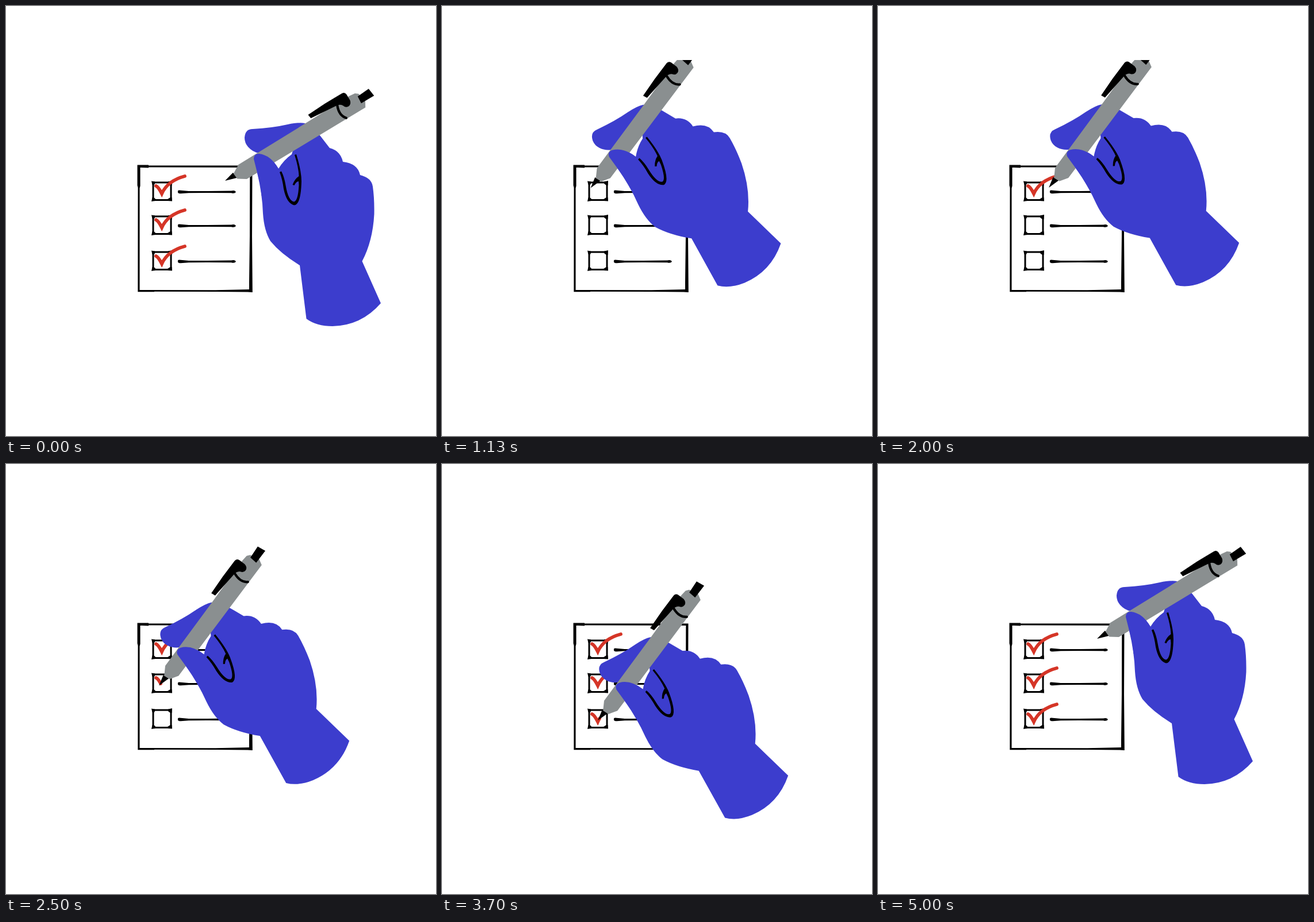
An HTML page for the animation above (5810 ms loop, 748x748 px).

```html
<!DOCTYPE html>
<html lang="en">
<head>
<meta charset="utf-8">
<title>Checklist</title>
<style>
  html, body { margin: 0; width: 100%; height: 100%; overflow: hidden; background: #fff; }
  svg { display: block; width: 100%; height: 100%; }
  .blue { fill: #3c3dcd; }
  .ink { fill: none; stroke: #000; stroke-linecap: round; }
  .check { fill: none; stroke: #d53527; stroke-width: 5.8; stroke-linecap: round; stroke-miterlimit: 6; }
</style>
</head>
<body>
<svg viewBox="0 0 748 748">
  <defs>
    <clipPath id="view"><rect y="94" width="748" height="654"/></clipPath>
    <g id="row">
      <path d="M256 307H287V337.500H256Z" fill="none" stroke="#000" stroke-width="3"/>
      <path d="M253 304.500L259 305.500V309L257 312L254.500 311ZM289 304L282 305.500V309L286 312H288.500ZM253 340L260 339V335.500L257 333H254.500ZM289 339.500L281 339V336L286 333H288.500Z"/>
      <path d="M299 321.500Q300 320 304 320.800L318 322H350L392 321.600Q398 320 400 323.500Q398 327 392 325.300L350 325L318 325.200L304 326.200Q298 327 299 321.500Z"/>
    </g>
  </defs>

  <g id="paper">
    <path d="M228.500 276.500H248L248 277.500H428.500L428 400L428.800 498L420 497.500L366 497L258 496.800V497.300H229.300L229.500 316L228.500 312ZM233.500 281V313L232.500 317V494L364 494.300L423 493V480L424 400L424.300 281L248 280.600V281.500Z" fill-rule="evenodd"/>
    <use href="#row"/>
    <use href="#row" y="59"/>
    <use href="#row" y="121"/>
  </g>
  <g id="checks"></g>

  <g clip-path="url(#view)">
    <g id="hand">
      <path class="blue" d="M440 256Q429 254 421 245Q415 238 415 229Q416 214 429 214
        Q464 212 490 206Q510 202 520 204L546 225L563 247Q582 252 586 271
        Q612 274 616 294Q636 299 638 314Q641 335 640.500 362Q638 409 619.500 444
        L652 517Q618 556 568 557Q540 557 522.500 544L511 451Q478 431 460 409
        Q449 391 447 361Q446 328 437 290L431 266Q431 257 440 257Q460 259 474 283
        Q483 268 497 258L505 232L445 262Z"/>
      <g transform="translate(381 304) rotate(-31)">
        <path d="M0 0L19 -5L23 7Z"/>
        <path fill="#8a8f90" d="M19 -3L34 -12L170 -13.500L262 -15L272 -14L277 -10L281 6L275 16.500L34 17L20 8Z"/>
        <path d="M273.500 -7L296.500 -8.400L298.500 6.600L272.500 6.400Z"/>
        <path d="M183 -24L218 -25.500L253 -25.500Q258 -25 258.500 -20L258.500 -8Q257 -0.500 250.500 -0.300Q245 -0.500 243.500 -6Q242 -10 236 -12L184 -16.300Z"/>
        <path class="ink" stroke-width="4.200" d="M235 -12Q228 5 237 15"/>
      </g>
      <path class="blue" d="M431 266Q431 257 440 257Q460 259 474 283L492 302L452 335L444.500 330Q443 310 437 290Z"/>
      <path d="M502 259L505 258Q514 287 514 305Q513 346 501 346.500Q488 343 483 318
        Q481 302 476 289L479 287.500Q484 297 486.500 312Q491 339 501 340.500
        Q508 339 509.500 312L509 305Q505 305 501.500 312L498.500 311Q502 301 509.500 296Q509 281 502 259Z"/>
    </g>
  </g>
</svg>

<script>
const LOOP = 5810, LAST = 5000;
const REST = { x: 381, y: 304, turn: 0 };
const TURN = -22;
const DRAW = 700;
const REACH = [550, 1160];
const LEAVE = [4110, 4750];
const FADE = [130, 530];

const SHAPE = "M261 313Q265 314.500 271 326.500Q281 304 311 296";
const NS = "http://www.w3.org/2000/svg";
const hand = document.getElementById("hand");
const layer = document.getElementById("checks");

const checks = [[0, 1160], [59, 2285], [122, 3410]].map(([dy, start]) => {
  const el = document.createElementNS(NS, "path");
  el.setAttribute("d", SHAPE);
  el.setAttribute("class", "check");
  el.setAttribute("transform", `translate(0 ${dy})`);
  layer.appendChild(el);
  return { el, dy, start, end: start + DRAW, len: el.getTotalLength() };
});

const span = (t, a, b) => Math.min(1, Math.max(0, (t - a) / (b - a)));
const ease = u => u < 0.5 ? 2 * u * u : 1 - 2 * (1 - u) * (1 - u);
const glide = (t, a, b) => ease(span(t, a, b));

function mix(a, b, f) {
  const at = k => a[k] + (b[k] - a[k]) * f;
  return { x: at("x"), y: at("y"), turn: at("turn") };
}

// pen tip while it stands at fraction f of a check mark
function tipOn(check, f) {
  const p = check.el.getPointAtLength(f * check.len);
  return { x: p.x - 3, y: p.y + 3.5 + check.dy, turn: TURN };
}

function pose(t) {
  if (t < checks[0].start) return mix(REST, tipOn(checks[0], 0), glide(t, ...REACH));
  for (let i = 0; i < checks.length; i++) {
    const c = checks[i], next = checks[i + 1];
    if (t < c.end) return tipOn(c, glide(t, c.start, c.end));
    if (next && t < next.start) return mix(tipOn(c, 1), tipOn(next, 0), glide(t, c.end, next.start));
  }
  return mix(tipOn(checks[2], 1), REST, glide(t, ...LEAVE));
}

// the picture advances at 0 and 30 ms of every tenth of a second
function step(t) {
  if (t >= LAST) return LAST;
  const r = t % 100;
  return t - r + (r >= 30 ? 30 : 0);
}

function render(t) {
  const fade = 1 - span(t, ...FADE);
  for (const c of checks) {
    const f = glide(t, c.start, c.end);
    const old = t < FADE[1];
    c.el.style.opacity = old ? fade : f > 0 ? 1 : 0;
    c.el.setAttribute("stroke-dasharray", old || f === 1 ? "none" : `${f * c.len} 200`);
  }
  const p = pose(t);
  hand.setAttribute("transform",
    `translate(${p.x} ${p.y}) rotate(${p.turn}) translate(${-REST.x} ${-REST.y})`);
}

const begin = performance.now();
function tick() {
  render(step((performance.now() - begin) % LOOP));
  requestAnimationFrame(tick);
}
tick();
</script>
</body>
</html>
```
